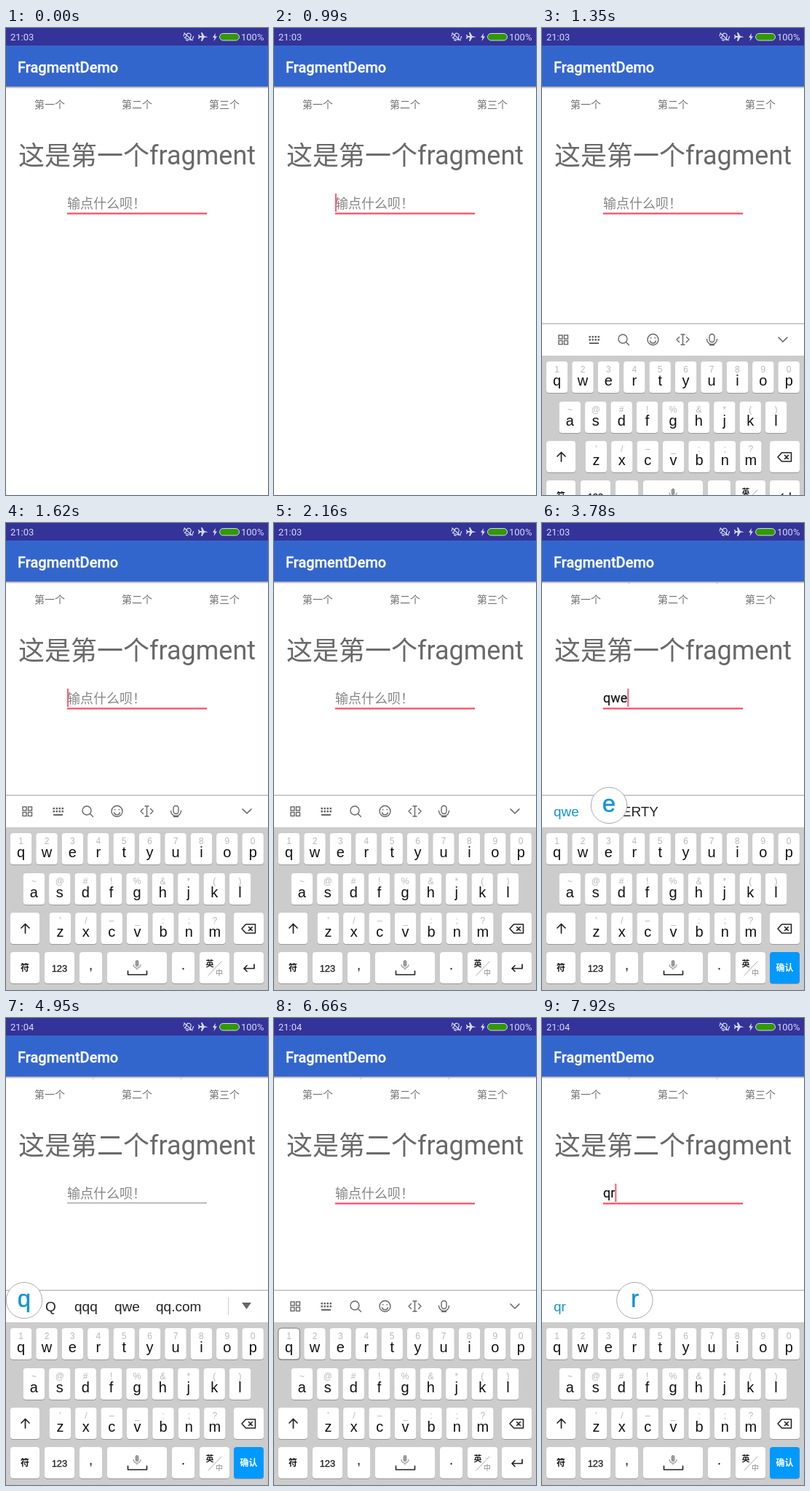
These frames come from a looping animation (360x640 px, 8000 ms). An HTML page:

```html
<!DOCTYPE html>
<html lang="zh">
<head>
<meta charset="utf-8">
<title>FragmentDemo</title>
<style>
html, body { margin: 0; height: 100%; overflow: hidden; background: #fff; }
svg { display: block; width: 100vw; height: 100vh; }
text { font-family: Roboto, "Noto Sans CJK SC", "Noto Sans CJK", sans-serif; white-space: pre; }
.kb text { font-family: "Liberation Sans", "Noto Sans CJK SC", "Noto Sans CJK", sans-serif; }
.line { fill: none; stroke-linecap: round; stroke-linejoin: round; }
</style>
</head>
<body>
<svg id="stage" viewBox="0 0 360 640"></svg>
<script>
const LOOP = 8000, STEP = 90, BLUE = '#1594d0', RED = '#ff5c74';
const SWITCH = 4050, FOCUS = 5940;

// Each track lists [start time, value]
const typed = [[-500, ''], [2790, 'q'], [3240, 'qw'], [3690, 'qwe'], [SWITCH, ''],
  [FOCUS, ''], [6750, 'q'], [7830, 'qr']];
const bars = [[0, ''], [2880, 'q'], [3240, 'qw'], [3690, 'qwe'], [SWITCH, ''],
  [4860, 'q'], [5850, ''], [7020, 'q'], [7830, 'qr']];
const popups = [[0, ''], [2790, 'q'], [3060, ''], [3240, 'w'], [3510, ''], [3690, 'e'], [3960, ''],
  [4860, 'q'], [5130, ''], [6750, 'q'], [7110, ''], [7830, 'r']];
const presses = [[0, ''], [2700, 'q'], [2790, ''], [3150, 'w'], [3240, ''], [3600, 'e'], [3690, ''],
  [4680, 'q'], [4860, ''], [6480, 'q'], [6750, ''], [7740, 'r'], [7830, '']];
const at = (track, t) => track.filter(step => step[0] <= t).pop();

const candidates = {
  q: [[16, 'q'], [54, 'Q'], [94, 'qqq'], [149, 'qwe'], [206, 'qq.com']],
  qw: [[16, 'qw'], [66, 'QWERTY']],
  qwe: [[16, 'qwe'], [77, 'QWERTY']],
  qr: [[16, 'qr']]
};
const rows = [
  [20.6, 425, 'qwertyuiop', '1 2 3 4 5 6 7 8 9 0'],
  [38.4, 480, 'asdfghjkl', '~ @ # ! % &amp; * ( )'],
  [74.4, 534, 'zxcvbnm', "' / – _ : ; ?"]
];
const PITCH = 35.4;

const text = (x, y, size, str, fill, extra = '') =>
  `<text x="${x}" y="${y}" font-size="${size}" fill="${fill}" ${extra}>${str}</text>`;
const mid = (x, y, size, str, fill, extra = '') =>
  text(x, y, size, str, fill, 'text-anchor="middle" ' + extra);
const rect = (x, y, w, h, fill, extra = '') =>
  `<rect x="${x}" y="${y}" width="${w}" height="${h}" fill="${fill}" ${extra}/>`;
const line = (d, color = '#666', width = 1.4) =>
  `<path class="line" d="${d}" stroke="${color}" stroke-width="${width}"/>`;
const key = (x, y, w, fill = '#fff') =>
  rect(x, y + 1, w, 43, '#999', 'rx="4"') + rect(x, y, w, 43, fill, 'rx="4"');
const heavier = (color, width) => `stroke="${color}" stroke-width="${width}"`;

const pen = document.createElement('canvas').getContext('2d');
function textWidth(str) {
  pen.font = '18px Roboto, sans-serif';
  return pen.measureText(str).width;
}

function header(t) {
  const light = '#d6daf2';
  return rect(0, 0, 360, 24, '#333399') + rect(0, 24, 360, 56, '#3366cc') +
    rect(0, 80, 360, 1, '#9a9ab0') + rect(0, 81, 360, 1, '#c4c4cc') + rect(0, 82, 360, 1, '#e8e8ec') +
    text(6, 17, 13, t < 4320 ? '21:03' : '21:04', light) +
    text(323, 17, 13, '100%', light) +
    // muted bell, plane, bolt, battery
    `<g transform="rotate(20 250 12)">${line('M246 15h9l-1.500-2v-3a3 3 0 0 0-6 0v3zM249 17h3M244 9v4M257 9v4', light, 1.2)}</g>` +
    line('M245 7l11 10', light, 1.2) +
    `<path d="M278 12.500 272.500 11l-3-5h-1.500l1 5h-2.500l-1.500-2h-1l.7 3-.7 3h1l1.500-2h2.500l-1 5h1.500l3-5z" fill="${light}"/>` +
    `<path d="M288 7l-4 6h2.500l-1 5 4.500-6.500h-2.700z" fill="${light}"/>` +
    rect(293.5, 7.500, 27, 9.500, '#339900', `rx="4.700" stroke="${light}"`) +
    text(16, 60.5, 20, 'FragmentDemo', '#fff', 'font-weight="500" ' + heavier('#fff', 0.3));
}

function fragment(t) {
  const [since, value] = at(typed, t);
  const focused = t < SWITCH || t >= FOCUS;
  const second = t >= SWITCH;
  let out = ['一', '二', '三'].map((n, i) => mid(60 + 120 * i, 109.500, 14, `第${n}个`, '#707070')).join('');
  if (t >= 2520) out += rect(119, 81, 1, 3, '#bbb') + rect(240, 81, 1, 3, '#bbb');
  out += mid(180, 188, 36, `这是第${second ? '二' : '一'}个<tspan dy="-1">fragment</tspan>`, '#696969');
  out += value ? text(84, 246, 18, value, '#111', heavier('#111', 0.2)) : text(84, 246.500, 18, '输点什么呗！', '#858585');
  out += focused ? rect(84, 253, 192, 2.5, RED) : rect(84, 253, 192, 1, '#888');
  if (focused && (t - since) % 1000 < 500)
    out += rect(84 + textWidth(value), 227, 2, 25, RED);
  return out;
}

function toolbar() {
  let out = '';
  for (const x of [23, 30.500]) for (const y of [389, 396.500])
    out += rect(x, y, 5, 5, 'none', 'stroke="#666" stroke-width="1.400"');
  for (let i = 0; i < 4; i++)
    out += rect(64.500 + 4 * i, 390, 2.500, 2.500, '#666') + rect(64.500 + 4 * i, 394, 2.500, 2.500, '#666');
  return out + rect(65, 399, 13, 2, '#666') +
    line('M117 394a6 6 0 1 1-12 0a6 6 0 1 1 12 0M115.500 398.500l4 4') +
    line('M160 395a7.500 7.500 0 1 1-15 0a7.500 7.500 0 1 1 15 0M148.500 397a4.200 4.200 0 0 0 8 0M149.700 392.500v.5M155.300 392.500v.5') +
    line('M193.500 388v14M191 388h5M191 402h5M188.500 391.500l-3.500 3.500 3.500 3.500M198.500 391.500l3.500 3.500-3.500 3.500') +
    line('M230 391a3.500 3.500 0 0 1 7 0v4a3.500 3.500 0 0 1-7 0zM226.500 394.500a7 7 0 0 0 14 0M230.500 402.500h6') +
    line('M325 392l6 6 6-6', '#666', 1.6);
}

function candidateBar(word) {
  const list = candidates[word];
  let out = list.map(([x, str], i) => text(x, 402, 19, str, i ? '#222' : BLUE)).join('');
  if (list.length > 4) out += rect(305, 383, 1, 24, '#ccc') + '<path d="M324 390h13l-6.500 9z" fill="#666"/>';
  return out;
}

function bottomRow(confirm) {
  let out = [[6, 40], [53, 41], [101, 31], [139, 82], [228, 31], [266, 41]]
    .map(([x, w]) => key(x, 588, w)).join('') + key(313, 588, 41, confirm ? '#0099ff' : '#fff');
  out += mid(26, 614, 12, '符', '#111', 'font-weight="700"') +
    mid(73.500, 614.500, 13, '123', '#222', heavier('#222', 0.3)) +
    mid(116.500, 612, 20, ',', '#222') + mid(243.500, 612, 20, '.', '#222') +
    rect(177.500, 599, 5, 9, '#999', 'rx="2.500"') +
    line('M175 605a5 5 0 0 0 10 0M180 610v2', '#999', 1.2) +
    line('M167.500 614v5h26v-5', '#222', 1.6) +
    mid(280, 608, 11, '英', '#222', 'font-weight="700"') + line('M278 620l18-19', '#aaa', 1) +
    mid(293, 620, 10, '中', '#888');
  return out + (confirm ? mid(333.500, 614, 12, '确认', '#fff', 'font-weight="700"')
    : line('M341 605v5.500h-14M331 606.500l-4 4 4 4', '#222', 1.7));
}

function keyboard(t) {
  if (t < 1170) return '';
  const left = Math.max(0, 1 - (t - 1170) / 276);
  const word = at(bars, t)[1], popup = at(popups, t)[1], pressed = at(presses, t)[1];
  let out = rect(0, 373, 360, 44, '#fff') + rect(0, 372.500, 360, 1.500, '#bbb') + rect(0, 417, 360, 223, '#ccc');
  out += word ? candidateBar(word) : toolbar();
  for (const [x0, y, letters, subs] of rows) {
    const marks = subs.split(' ');
    [...letters].forEach((c, i) => {
      const x = x0 + PITCH * i;
      out += key(x - 14.700, y, 29.400);
      if (c === pressed) out += rect(x - 14.700, y, 29.400, 43, 'none', 'rx="4" stroke="#777"');
      out += mid(x, y + 15, 12, marks[i], '#b8b8b8') + mid(x, y + 33, 20, c, '#111');
    });
  }
  out += key(6, 534, 40) + key(313, 534, 41) +
    line('M26.500 562v-12M21 555l5.500-5.500 5.500 5.500', '#222', 1.7) +
    line('M329.500 550h13v12h-13l-5.500-6zM333.500 553.500l5 5M338.500 553.500l-5 5', '#222', 1.6) +
    bottomRow(word);
  if (popup) {
    const x = Math.max(25, 21.2 + PITCH * rows[0][2].indexOf(popup));
    out += `<circle cx="${x}" cy="387" r="24.700" fill="#fff" stroke="#aaa"/>` +
      mid(x, 395.5, 33, popup, BLUE, heavier(BLUE, 0.5));
  }
  return `<g class="kb" transform="translate(0 ${Math.round(267 * left * left)})">${out}</g>`;
}

const stage = document.getElementById('stage');
const start = performance.now();
let shown = '';
function draw() {
  const now = (performance.now() - start) % LOOP;
  const t = Math.floor((now + 1) / STEP) * STEP;
  const scene = header(t) + fragment(t) + keyboard(t);
  if (scene !== shown) stage.innerHTML = shown = scene;
  requestAnimationFrame(draw);
}
draw();
</script>
</body>
</html>
```
